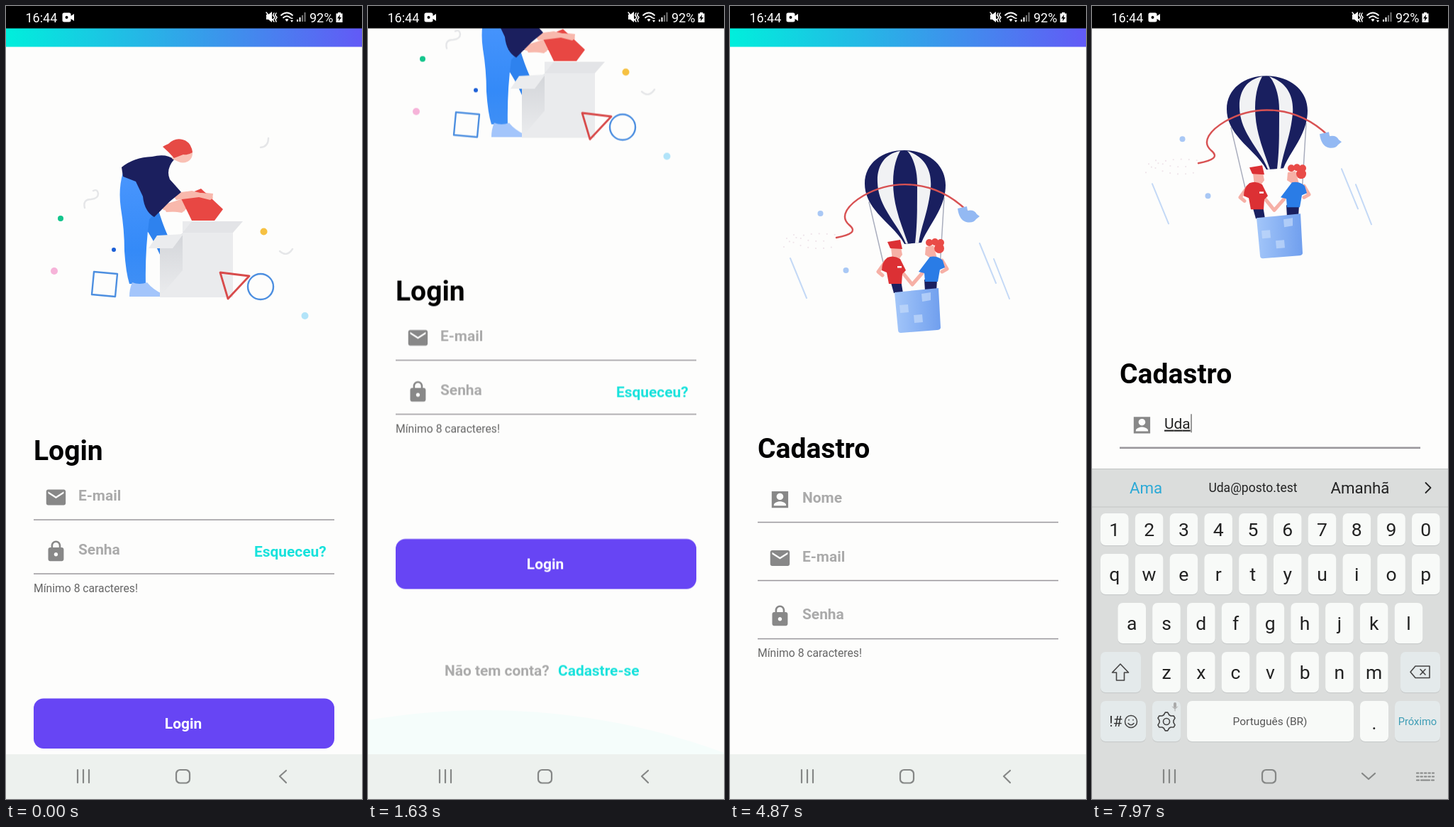
An HTML page that plays this animation: 502 by 1116 pixels, repeating every 8 s.

```html
<!DOCTYPE html>
<html lang="pt-BR">
<head>
<meta charset="utf-8">
<title>Login</title>
<style>
html, body { margin: 0; width: 100%; height: 100%; overflow: hidden; background: #fdfdfc; }
svg { display: block; width: 100%; height: 100%; }
text { font-family: Roboto, sans-serif; white-space: pre; }
.h1 { font-size: 39px; font-weight: 700; }
.b { font-size: 20.9px; font-weight: 700; }
.hint { fill: #aaa; }
.link { fill: #18e2dc; }
.help { font-size: 15.7px; fill: #666; }
.rule { fill: #9a979c; }
.icon { fill: #888; }
.line { fill: none; stroke-linecap: round; stroke-linejoin: round; }
.mid { text-anchor: middle; }

.anim, .step { animation: 8s linear infinite; }
.step { animation-timing-function: step-end; }

#loginPage { animation-name: loginScroll; }
@keyframes loginScroll {
  0%, .375% { transform: none; animation-timing-function: cubic-bezier(.4,.3,.7,.8); }
  6.25% { transform: translateY(-152.5px); animation-timing-function: cubic-bezier(.3,.66,.6,1); }
  15%, 100% { transform: translateY(-224.5px); }
}
#glow { animation-name: glow; }
@keyframes glow {
  0%, 17.8% { opacity: 0; transform: translateY(62px); }
  19.6%, 20.4% { opacity: 1; transform: none; animation-timing-function: ease-out; }
  25.9%, 100% { opacity: 0; transform: translateY(62px); }
}
#signup { animation-name: enter, fade; }
@keyframes enter {
  0%, 48.375% { transform: translateY(279px); animation-timing-function: cubic-bezier(.4,0,.2,1); }
  52.125%, 100% { transform: none; }
}
@keyframes fade {
  0%, 48.375% { opacity: 0; animation-timing-function: ease-in; }
  52.125%, 100% { opacity: 1; }
}
#signupPage { animation-name: signupScroll; }
@keyframes signupScroll {
  0%, 74% { transform: none; animation-timing-function: cubic-bezier(.4,0,.2,1); }
  76%, 91.6% { transform: translateY(-102px); animation-timing-function: cubic-bezier(.4,0,.2,1); }
  92.8%, 100% { transform: translateY(-104.7px); }
}
#keyboard { animation-name: rise; }
@keyframes rise {
  0%, 72.5% { transform: translateY(466px); animation-timing-function: cubic-bezier(.2,.4,.2,1); }
  75.6%, 100% { transform: none; }
}
.untilKeyboard { animation-name: untilKeyboard; }
@keyframes untilKeyboard { 0% { visibility: visible } 72.6% { visibility: hidden } }
.fromKeyboard { animation-name: fromKeyboard; }
@keyframes fromKeyboard { 0% { visibility: hidden } 72.6% { visibility: visible } }
.fromFocus { animation-name: fromFocus; }
@keyframes fromFocus { 0% { visibility: hidden } 71.25% { visibility: visible } }
.untilTyped { animation-name: untilTyped; }
@keyframes untilTyped { 0% { visibility: visible } 91.6% { visibility: hidden } }
.fromTyped { animation-name: fromTyped; }
@keyframes fromTyped { 0% { visibility: hidden } 91.6% { visibility: visible } }

#typed { font-size: 20.9px; }
#typed tspan { fill: #222; text-decoration: underline; text-decoration-thickness: 1.3px; }
.c2 { animation-name: second; }
@keyframes second { 0% { fill: transparent } 94.5% { fill: #222 } }
.c3 { animation-name: third; }
@keyframes third { 0% { fill: transparent } 97.4% { fill: #222 } }
#caret { animation-name: blink, caretMove; }
@keyframes blink {
  0%, 76.25%, 88.75% { opacity: 0 }
  71.25%, 82.5%, 91.25% { opacity: 1 }
}
@keyframes caretMove {
  0% { transform: none }
  91.6% { transform: translateX(13.6px) }
  94.5% { transform: translateX(25.4px) }
  97.4% { transform: translateX(37px) }
}
</style>
</head>
<body>
<svg viewBox="0 0 502 1116">
<defs>
  <linearGradient id="bar"><stop stop-color="#00efdc"/><stop offset="1" stop-color="#625af6"/></linearGradient>
  <linearGradient id="leg" x2="0" y2="1"><stop stop-color="#4a96fd"/><stop offset=".7" stop-color="#348af8"/><stop offset="1" stop-color="#3f8ff5"/></linearGradient>
  <linearGradient id="boxSide" x2="0" y2="1"><stop stop-color="#d3d5d9"/><stop offset="1" stop-color="#ebecee"/></linearGradient>
  <linearGradient id="basket"><stop stop-color="#a3c6f9"/><stop offset="1" stop-color="#709fee"/></linearGradient>
  <path id="mail" d="M20 4H4c-1.1 0-2 .9-2 2v12c0 1.1.9 2 2 2h16c1.1 0 2-.9 2-2V6c0-1.1-.9-2-2-2zm0 4l-8 5-8-5V6l8 5 8-5v2z"/>
  <path id="lock" d="M18 8h-1V6c0-2.76-2.24-5-5-5S7 3.24 7 6v2H6c-1.1 0-2 .9-2 2v10c0 1.1.9 2 2 2h12c1.1 0 2-.9 2-2V10c0-1.1-.9-2-2-2zm-6 9c-1.1 0-2-.9-2-2s.9-2 2-2 2 .9 2 2-.9 2-2 2zm3.1-9H8.9V6c0-1.71 1.39-3.1 3.1-3.1s3.1 1.39 3.1 3.1v2z"/>
  <path id="person" d="M3.500 3.500V20.500H20.500V3.500zm12 5.500c0 1.900-1.600 3.400-3.500 3.400s-3.500-1.500-3.500-3.400 1.600-3.400 3.500-3.400 3.500 1.500 3.500 3.400zm-9.800 8.400c0-2.300 4.200-3.500 6.300-3.500s6.300 1.200 6.300 3.500v1H5.700v-1z"/>
</defs>
<rect width="502" height="1116" fill="#fdfdfc"/>

<g id="loginPage" class="anim">
  <rect y="31" width="502" height="26.500" fill="url(#bar)"/>
  <!-- unpacking scene -->
  <path fill="#2e82ee" d="M196 288L214 284Q220 305 228 323L218 352Q206 325 196 312Z"/>
  <path fill="url(#leg)" d="M165 234Q158 258 162 285Q167 315 167 345Q169 375 174 391H197Q196 345 202 300L212 290L192 250Z"/>
  <path fill="#a3c5fb" d="M178 389Q188 393 199 389Q207 399 222 406V409H174Q174 398 178 389Z"/>
  <path fill="#eaebed" d="M217 338H249V303H320V410H217Z"/>
  <path fill="url(#boxSide)" d="M217 339L249 320V372L217 409Z"/>
  <path fill="#e3e4e7" d="M262 303H334L320 319H249Z"/>
  <path fill="#ebecee" d="M213 323L250 321L235 341H201Z"/>
  <path fill="#f8b8ac" d="M218 281L250 271L274 262L292 264L291 273L262 279L248 291L222 287Z"/>
  <path fill="#e84743" d="M275 257L306 286L294 302H262L246 269Z"/>
  <path fill="#f8b8ac" d="M234 264L262 260L274 263Q286 262 292 270L288 273L272 269L240 273ZM222 282L248 283L252 289L226 290Z"/>
  <path fill="#1b1f5e" d="M163 227Q180 213 206 212Q226 207 237 216Q225 230 231 244Q241 255 247 262L231 275L209 297Q195 289 193 268L183 247L165 240Z"/>
  <path fill="#f9c0b4" d="M236 207L262 201Q265 211 259 217Q251 223 243 219L234 215Z"/>
  <path fill="#e64a45" d="M221 198Q224 196 229 194Q238 185 249 188Q261 191 263 206Q257 210 250 209L237 214Q230 206 221 198Z"/>
  <g class="line" stroke-width="2.4">
    <path stroke="#4d8fe0" d="M124 374L157 377L154 409L121 406Z"/>
    <path stroke="#d84b4b" stroke-width="2.8" d="M302 375L343 380L313 412Z"/>
    <circle stroke="#4d8fe0" cx="359" cy="395" r="18"/>
    <path stroke="#e5e6e8" d="M111 284Q108 272 120 272Q130 271 130 264Q129 257 123 260M370 186Q370 198 359 199M386 345Q396 354 404 342"/>
  </g>
  <circle cx="77" cy="299" r="4" fill="#13c58c"/>
  <circle cx="68" cy="373" r="5" fill="#f6b3d9"/>
  <circle cx="152" cy="343" r="3" fill="#1c5fd6"/>
  <circle cx="363.500" cy="317.500" r="5" fill="#f6c142"/>
  <circle cx="421.500" cy="436" r="5" fill="#b2e4f9"/>

  <text class="h1" x="39" y="638.500">Login</text>
  <g data-field="mail" data-y="691.5" data-label="E-mail" data-base="695.8" data-rule="723"></g>
  <g data-field="lock" data-y="767.5" data-label="Senha" data-base="771.6" data-rule="799"></g>
  <text class="b link" x="350" y="775">Esqueceu?</text>
  <text class="help" x="39" y="825">Mínimo 8 caracteres!</text>
  <rect x="39" y="974.500" width="424" height="70.500" rx="14" fill="#6745f4"/>
  <text class="b mid" x="250" y="1017" fill="#fff">Login</text>
  <text class="b hint" x="108" y="1167">Não tem conta?</text>
  <text class="b link" x="268" y="1167">Cadastre-se</text>
</g>
<circle id="glow" class="anim" cx="165" cy="1970" r="979" fill="#00e5dc" fill-opacity=".03"/>

<g id="signup" class="anim">
<rect width="502" height="1400" fill="#fdfdfc"/>
<g id="signupPage" class="anim">
  <rect y="31" width="502" height="26.500" fill="url(#bar)"/>
  <!-- balloon scene -->
  <g class="line" stroke="#c4d9f6" stroke-width="2">
    <path d="M85 355L108 411M352 334L375 390M372 356L394 412"/>
    <path stroke="#efe4ea" stroke-width="2.200" stroke-dasharray="0 11" d="M76 339Q95 315 148 322M80 327Q110 348 150 338M90 322Q108 334 140 330"/>
  </g>
  <path class="line" stroke="#a9adbd" stroke-width="1.500" d="M196 276L217 365M302 270L296 368"/>
  <path fill="#191f5f" d="M190 250C190 221 215 203 246 203C280 203 304 224 304 252C304 285 280 308 270 333L246 335C232 308 190 288 190 250Z"/>
  <path fill="#f1f2f4" d="M240 204C218 208 207 225 208 248C209 284 238 308 248 334.500L251 334.500C242 308 230 282 230 248C230 225 236 211 240 204ZM250 204C274 212 285 230 283 256C280 288 270 308 266 333.500L261 334C264 308 264 290 264 250C264 230 258 212 250 204Z"/>
  <path class="line" stroke="#d85253" stroke-width="2.400" d="M150 326C171 322 179 317 168 308C154 296 166 280 188 267C232 242 290 245 334 288"/>
  <path fill="#93b9f3" d="M321 285L334 282L335 288Q344 286 348 293L352 296L347 300Q343 306 333 304Q323 301 321 285Z"/>
  <circle cx="127.500" cy="292" r="4" fill="#a9c8f5"/>
  <circle cx="163.500" cy="372" r="4" fill="#a9c8f5"/>
  <path fill="#1a2060" d="M226 386H241L244 404H231ZM274 385H292L291 402H275Z"/>
  <path class="line" stroke="#f6b0a6" stroke-width="5" d="M219 360L209 374L215 379M244 376L257 392L271 376M299 358L306 370L299 374"/>
  <path fill="#f6b0a6" d="M227 340H241L243 350L237 358H229ZM276 339L287 337L292 355H283L275 350Z"/>
  <path fill="#dc3034" d="M222 354Q231 350 240 356L248 372L243 377L242 391H224L221 375L214 372Q214 360 222 354ZM222 332L240 329L243 342L226 341Z"/>
  <path fill="#2a7ce6" d="M282 353Q292 351 300 358L303 368L296 371L293 388H275L274 376L266 374Z"/>
  <g fill="#e94b47">
    <circle cx="281" cy="333" r="5"/><circle cx="289" cy="332" r="5"/>
    <circle cx="297" cy="333" r="5"/><circle cx="295" cy="341" r="7"/>
  </g>
  <path fill="#fff" d="M236 366h6v2.500h-6z"/>
  <path fill="url(#basket)" d="M232 403L294 397L297 453Q296 456 292 456L241 460Q237 460 237 456Z"/>
  <path fill="#c3dafb" fill-opacity=".7" d="M270 405L283 403V414L271 416ZM239 421L251 420L252 431L240 432ZM259 435L271 434L272 445L260 446Z"/>

  <text class="h1" x="39" y="636">Cadastro</text>
  <g data-field="person" data-y="694.5" data-base="699.3" data-rule="726.5"></g>
  <text class="b hint step untilTyped" x="102" y="699.300">Nome</text>
  <rect class="rule step fromFocus" x="39" y="725.200" width="424" height="2.800"/>
  <text id="typed" class="step fromTyped" x="102" y="699.300"><tspan>U</tspan><tspan class="step c2">d</tspan><tspan class="step c3">a</tspan></text>
  <rect id="caret" class="step" x="102" y="679" width="2" height="26" fill="#999"/>
  <g data-field="mail" data-y="777" data-label="E-mail" data-base="781.5" data-rule="808.5"></g>
  <g data-field="lock" data-y="858.5" data-label="Senha" data-base="863.2" data-rule="890.5"></g>
  <text class="help" x="39" y="916">Mínimo 8 caracteres!</text>
</g>
</g>

<rect y="1053" width="502" height="63" fill="#edf1ee"/>
<g id="keyboard" class="anim"></g>
<g class="line" stroke="#858786" stroke-width="2.200" stroke-linecap="butt">
  <path d="M101 1075V1093M109 1075V1093M117 1075V1093"/>
  <rect x="240" y="1075" width="19" height="18.500" rx="5.500"/>
  <path class="step untilKeyboard" d="M395 1076L386 1084L395 1093"/>
  <g class="step fromKeyboard">
    <path d="M381 1080L390 1088L399 1080"/>
    <path stroke-dasharray="2.4 3.1" d="M458 1079.500H482M458 1084.500H482"/>
    <path d="M458 1089.500H461M464 1089.500H476M479 1089.500H482"/>
  </g>
</g>

<rect width="502" height="31.500" fill="#000"/>
<g fill="#fff" font-size="18">
  <text x="27.500" y="22.500">16:44</text>
  <text x="428" y="22.500">92%</text>
  <path d="M82 9.500H89Q91.500 9.500 91.500 12V14L96 11V21L91.500 18V20Q91.500 22.500 89 22.500H82Q79.500 22.500 79.500 20V12Q79.500 9.500 82 9.500Z"/>
  <circle cx="85.500" cy="16" r="2" fill="#000"/>
  <path d="M367 12H370L375 8V23L370 19H367Z"/>
  <path class="line" stroke="#fff" stroke-width="1.500" d="M367 9L378 22M378 10L376.500 13L379 16L377 19M381 10L379.500 13L382 16L380 19L381 22"/>
  <path class="line" stroke="#fff" stroke-width="1.800" d="M388 13Q396 6 404 13M391 16.500Q396 12 401 16.500"/>
  <path d="M393.500 19Q396 17 398.500 19L396 22ZM401 18l2-2 2 2zM401 20h4l-2 3z"/>
  <path d="M410 19h2v3h-2zM413.500 16h2v6h-2z"/>
  <path fill="#777" d="M417 13h2v9h-2zM420.500 9h2v13h-2z"/>
  <path d="M468 9h4v1.500h2.500V23h-9V10.500h2.500z"/>
  <path fill="#000" d="M471 12L467 17.500H469.500L469 21.500L473 16H470.500Z"/>
</g>
</svg>
<script>
for (const field of document.querySelectorAll('[data-field]')) {
  const { field: icon, y, label = '', base, rule } = field.dataset;
  field.innerHTML = `<use href="#${icon}" class="icon" transform="translate(54 ${y - 16.4}) scale(1.37)"/>
    <text class="b hint" x="102" y="${base}">${label}</text>
    <rect class="rule" x="39" y="${rule - .7}" width="424" height="1.5"/>`;
}

const PITCH = 48.78;
const key = (x, y, w, h, fill = '#f8faf8') =>
  `<rect x="${x}" y="${y + 1.3}" width="${w}" height="${h}" rx="7" fill="#c9cccc"/>
   <rect x="${x}" y="${y}" width="${w}" height="${h}" rx="7" fill="${fill}"/>`;
const label = (x, y, size, text, fill = '#222') =>
  `<text class="mid" x="${x}" y="${y}" font-size="${size}" fill="${fill}">${text}</text>`;
const stroke = (d, color = '#444', width = 1.6) =>
  `<path class="line" d="${d}" stroke="${color}" stroke-width="${width}"/>`;
const group = (name, body) => `<g class="step ${name}">${body}</g>`;

const rows = [
  ['1234567890', 12, 714, 45, 746],
  ['QWERTYUIOP', 12, 771, 57, 809],
  ['ASDFGHJKL', 36.4, 840, 57, 878],
  ['ZXCVBNM', 85.2, 909, 57, 947],
];
const eachKey = draw => rows.map(row =>
  [...row[0]].map((char, i) => draw(char, row[1] + i * PITCH, row)).join('')).join('');
const letters = change => eachKey((char, x, row) => label(x + 19.8, row[4], 26.5, change(char)));

const gear = Array.from({ length: 24 }, (_, i) => {
  const radius = i % 4 < 2 ? 13 : 10;
  const angle = (i + 1.5) * Math.PI / 12;
  return `${105 + radius * Math.cos(angle)} ${1007 + radius * Math.sin(angle)}`;
}).join('L');
const shift = 'M40 926L51.500 938H45.500V949H34.500V938H28.500Z';
const soft = '#e4eaeb', blue = '#35a6d0';

document.getElementById('keyboard').innerHTML =
  '<rect y="651" width="502" height="466" fill="#dbdddc"/>' +
  '<path d="M0 651.500H502M0 705H502" stroke="#c2c4c3"/>' +
  stroke('M470.500 671L477.500 678L470.500 685', '#222', 1.8) +
  eachKey((_, x, row) => key(x, row[2], 39.6, row[3])) +
  key(12, 909, 57, 57, soft) + key(435, 909, 56, 57, soft) +
  key(12, 978, 64, 57, soft) + key(85, 978, 40, 57, soft) +
  key(134, 978, 235, 57) + key(378, 978, 40, 57) + key(427, 978, 64, 57, soft) +
  stroke('M456 929H476V945.500H456L449 937.200ZM463 933.500L470 941M470 933.500L463 941') +
  label(33.5, 1014, 21, '!#', '#333') +
  '<circle class="line" cx="55" cy="1007" r="8.500" stroke="#444" stroke-width="1.500"/>' +
  stroke('M51 1009.500Q55 1014 59 1009.500M52 1004.500V1005M58 1004.500V1005') +
  stroke(`M${gear}Z`) +
  '<circle class="line" cx="105" cy="1007" r="4.500" stroke="#444" stroke-width="1.600"/>' +
  stroke('M117 982V986', '#aaa', 4) + stroke('M113.500 986Q117 992 120.500 986M117 989V992', '#aaa', 1) +
  label(251, 1012, 15.5, 'Português (BR)', '#555') +
  label(398, 1018, 26, '.') + label(459, 1012, 14.7, 'Próximo', '#3d9db5') +
  group('untilTyped', letters(c => c) + stroke(shift, blue) +
    label(75, 683.5, 15.2, 'TOVALINDO@B...', blue) +
    label(227, 686, 22.4, 'SALÁRIOS') + label(378, 686, 22.4, 'SALÁRIO')) +
  group('fromTyped', letters(c => c.toLowerCase()) + stroke(shift) +
    label(76, 686, 22.3, 'Ama', '#2ba9d6') +
    label(227, 684, 17.5, 'Uda@posto.test') + label(378, 686, 22.3, 'Amanhã'));
</script>
</body>
</html>
```
